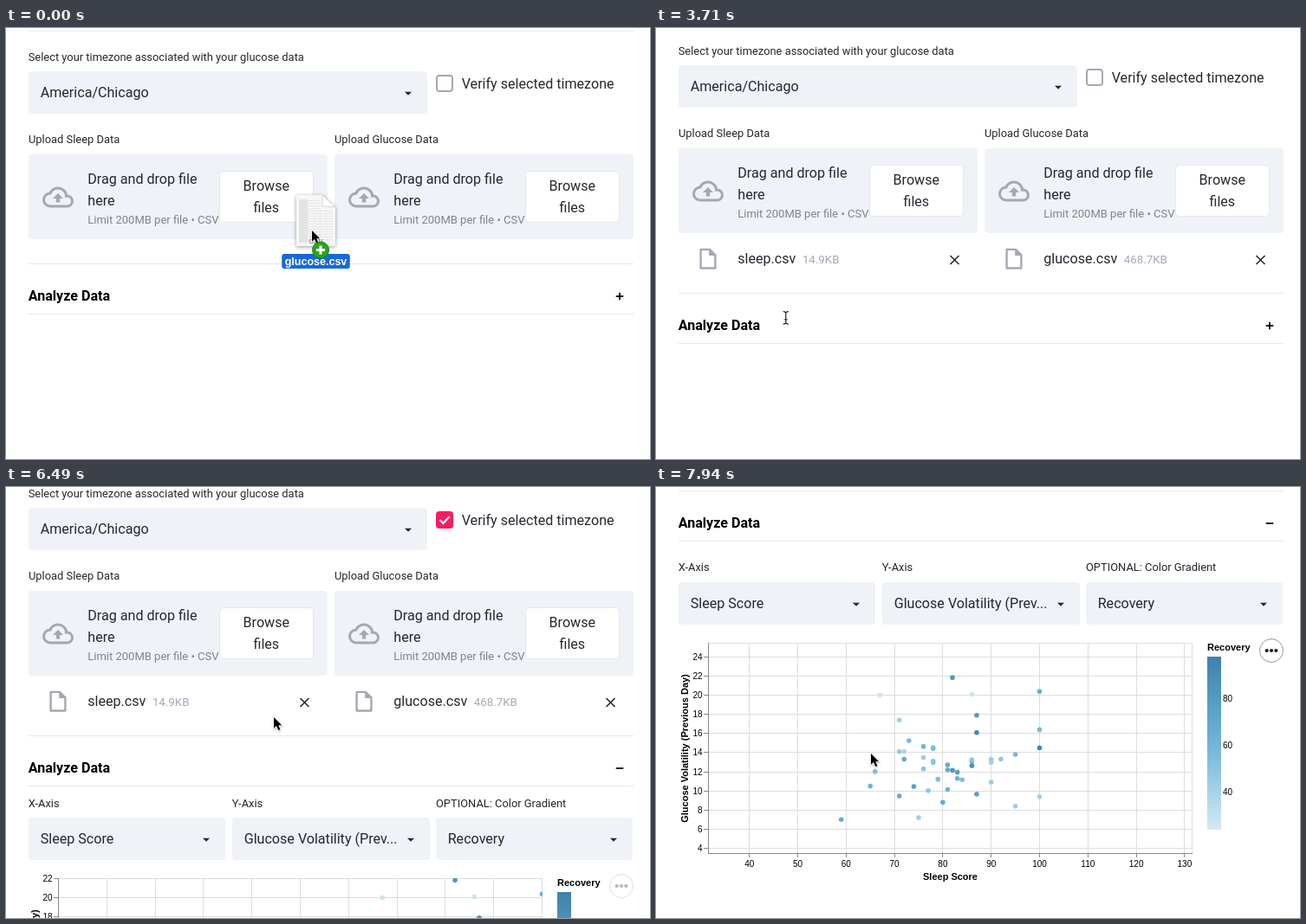
An HTML page with a canvas that plays this animation: 743x498 px, repeating every 8 s.

```html
<!DOCTYPE html>
<html lang="en">
<head>
<meta charset="utf-8">
<title>Glucose and sleep upload</title>
<style>
  html, body { margin: 0; width: 100%; height: 100%; overflow: hidden; background: #fff; }
  canvas { display: block; }
</style>
</head>
<body>
<canvas id="stage" width="743" height="498"></canvas>
<script>
const W = 743, H = 498, LOOP = 8000;
const ctx = document.getElementById('stage').getContext('2d');
const UI = 'Roboto, "Open Sans", sans-serif';
const PLOT = '"Liberation Sans", Arial, sans-serif';
const INK = '#262730', PANEL = '#eff2f6', MUTED = '#a3a8b4', RULE = '#e6e8ec';
const BODY = 16.1, SMALL = 12.9;

// Moments when the page changes, in ms
const DROP_GLUCOSE = 770, LEAVE = 1360, ENTER = 2650, DROP_SLEEP = 3330;
const WARN = 3800, CHECK = 4840, CLEAR = 6205, OPEN = 6350, JUMP = 6865, GRAB = 7366;

// Pointer path: time, x, y
const pointer = [
  [100, 353, 234], [380, 478, 200], [DROP_GLUCOSE, 478, 200], [1260, 300, 330],
  [2560, 0, 227], [3140, 128, 202], [3600, 128, 202], [3710, 149, 335], [4380, 330, 262],
  [4750, 506, 50], [4930, 506, 50], [5130, 405, 387], [5610, 362, 349], [6300, 340, 330],
  [6490, 309, 266], [7250, 309, 266], [GRAB, 424, 270], [7940, 248, 308]
];

const ramp = [[0, 213, 233, 244], [0.5, 111, 180, 214], [1, 62, 130, 172]];

// Sleep score, volatility, recovery: the outlying days, then a seeded cluster
const readings = [
  [59, 7, 66], [67, 20, 27], [71, 17.4, 42], [75, 7.2, 42], [82, 21.85, 82], [86, 20.1, 27],
  [87, 17.9, 82], [87, 16.1, 94], [95, 13.8, 57], [95, 8.4, 42],
  [100, 20.4, 66], [100, 16.4, 57], [100, 14.5, 94], [100, 9.4, 42]
];
let seed = 11;
const rand = () => (seed = (seed * 16807) % 2147483647) / 2147483647;
const spread = (mid, range) => mid + range * (rand() + rand() - 1);
for (let i = 0; i < 33; i++)
  readings.push([Math.round(spread(79, 14)), spread(12.3, 4.4), spread(58, 38)]);

const progress = (t, a, b) => Math.min(1, Math.max(0, (t - a) / (b - a)));

function track(keys, t) {
  const i = keys.findIndex(k => t <= k[0]);
  if (i === 0) return keys[0].slice(1);
  if (i < 0) return keys[keys.length - 1].slice(1);
  const a = keys[i - 1], b = keys[i], k = progress(t, a[0], b[0]);
  return a.slice(1).map((v, j) => v + (b[j + 1] - v) * k);
}

function text(s, x, y, size = BODY, color = INK, align = 'left', weight = 400, family = UI) {
  ctx.font = `${weight} ${size}px ${family}`;
  ctx.fillStyle = color;
  ctx.textAlign = align;
  ctx.fillText(s, x, y);
}

const plotText = (s, x, y, align, size = 10, weight = 400) =>
  text(s, x, y, size, '#000', align, weight, PLOT);

function stroke(color, width = 1) {
  ctx.strokeStyle = color;
  ctx.lineWidth = width;
  ctx.stroke();
}

function box(x, y, w, h, r, fill, edge) {
  ctx.beginPath();
  ctx.roundRect(x, y, w, h, r);
  ctx.fillStyle = fill;
  ctx.fill();
  if (edge) stroke(edge);
}

function poly(...pts) {
  ctx.beginPath();
  pts.forEach(([x, y]) => ctx.lineTo(x, y));
}

function fillPoly(color, ...pts) {
  poly(...pts);
  ctx.fillStyle = color;
  ctx.fill();
}

function line(x1, y1, x2, y2, color, width) {
  poly([x1, y1], [x2, y2]);
  stroke(color, width);
}

function disc(x, y, r, fill) {
  ctx.beginPath();
  ctx.arc(x, y, r, 0, Math.PI * 2);
  ctx.fillStyle = fill;
  ctx.fill();
}

function at(x, y, scale, paint) {
  ctx.save();
  ctx.translate(x, y);
  ctx.scale(scale, scale);
  paint();
  ctx.restore();
}

const rule = y => line(26, y + 0.5, 724, y + 0.5, RULE);

function cloud() {
  const deg = Math.PI / 180;
  ctx.beginPath();
  ctx.arc(19, 15, 4, 90 * deg, -98 * deg, true);
  ctx.arc(12, 11.5, 6.5, -5 * deg, -157 * deg, true);
  ctx.arc(6, 14, 5, -90 * deg, -270 * deg, true);
  ctx.closePath();
  stroke(MUTED, 2);
  fillPoly(MUTED, [8, 13], [12, 9], [16, 13]);
  ctx.fillRect(10.55, 12.9, 2.9, 3.1);
}

function sheet() {
  poly([5, 3], [13.6, 3], [19, 8.4], [19, 21], [5, 21]);
  ctx.closePath();
  ctx.lineJoin = 'round';
  stroke(MUTED, 2);
  fillPoly(MUTED, [13, 3], [13, 9], [19, 9]);
}

function select(x, y, w, label) {
  box(x, y, w, 49, 4, PANEL);
  text(label, x + 13.7, y + 30);
  const cx = x + w - 22, cy = y + 23.7;
  fillPoly(INK, [cx - 4, cy], [cx + 4, cy], [cx, cy + 4]);
}

function uploader(x, title, file, size) {
  const tx = x + 68.3;
  text(title, x, 133, SMALL);
  box(x, 146, 345, 98, 4, PANEL);
  at(x + 16, 177.5, 1.5, cloud);
  text('Drag and drop file', tx, 180);
  text('here', tx, 205);
  text('Limit 200MB per file • CSV', tx, 226, 13, '#7f8390');
  box(x + 220.5, 165.5, 108, 59, 4, '#fff', RULE);
  text('Browse', x + 274.3, 188, BODY, INK, 'center');
  text('files', x + 274.3, 213, BODY, INK, 'center');
  if (!file) return;
  at(x + 19.6, 259.3, 1.2, sheet);
  text(file, tx, 279);
  text(size, tx + ctx.measureText(file).width + 7.5, 279, 13.3, MUTED);
  for (const s of [-5, 5]) line(x + 313.5, 275 - s, x + 323.5, 275 + s, INK, 1.6);
}

function checkbox(on, focus) {
  if (focus) box(496, 52, 228, 24, 4, PANEL);
  if (on) {
    box(496, 54, 20, 20, 4, '#fd1a5e');
    poly([500.6, 64], [504.4, 67.8], [511.6, 60.2]);
    stroke('#fff', 2.2);
  } else {
    box(497, 55, 18, 18, 3, '#fff');
    stroke(MUTED, 2);
  }
  text('Verify selected timezone', 525.7, 70);
}

const shade = value =>
  `rgb(${track(ramp, (value - 23.7) / 74.1).map(Math.round).join()})`;

function chart(top, panX, panY, hover) {
  const left = 60, right = 618, bottom = top + 243;
  const px = v => left + 0.5 + v * 5.58 + panX;
  const py = v => top + 0.5 + (22 - v) * 11.05 + panY;
  const crisp = v => Math.floor(v) + 0.5;

  ctx.strokeStyle = '#ddd';
  ctx.lineWidth = 1;
  ctx.strokeRect(left + 0.5, top + 0.5, right - left, bottom - top);
  for (let v = 0; v <= 140; v += 10) {
    const x = crisp(px(v));
    if (x < left || x > right + 1) continue;
    line(x, top, x, bottom, '#ddd');
    line(x, bottom, x, bottom + 5, '#888');
    plotText(v, px(v), bottom + 16, 'center');
  }
  for (let v = 0; v <= 30; v += 2) {
    const y = crisp(py(v));
    if (y < top || y > bottom + 1) continue;
    line(left, y, right, y, '#ddd');
    line(left - 5, y, left, y, '#888');
    plotText(v, left - 6.5, py(v) + 3.5, 'right');
  }

  ctx.save();
  ctx.beginPath();
  ctx.rect(left, top, right - left + 1, bottom - top);
  ctx.clip();
  for (const [score, vol, recovery] of readings) disc(px(score), py(vol), 2.8, shade(recovery));
  ctx.restore();

  line(left + 0.5, top, left + 0.5, bottom + 1, '#888');
  line(left, bottom + 0.5, right + 1, bottom + 0.5, '#888');
  plotText('Sleep Score', 339.5, bottom + 31, 'center', 11, 700);
  at(36.5, top + 122, 1, () => {
    ctx.rotate(-Math.PI / 2);
    plotText('Glucose Volatility (Previous Day)', 0, 0, 'center', 11, 700);
  });

  plotText('Recovery', 636, top + 9, 'left', 11, 700);
  const g = ctx.createLinearGradient(0, top + 216, 0, top + 16);
  for (const [k, ...rgb] of ramp) g.addColorStop(k, `rgb(${rgb})`);
  ctx.fillStyle = g;
  ctx.fillRect(636, top + 16, 16, 200);
  for (let v = 40; v <= 80; v += 20) plotText(v, 654, top + 284 - 2.7 * v, 'left');

  ctx.save();
  ctx.globalAlpha = hover ? 1 : 0.32;
  disc(710, top + 9, 13.5, '#fff');
  stroke('#999');
  for (const d of [-5.3, 0, 5.3]) disc(710 + d, top + 9, 2.1, '#1b1e23');
  ctx.restore();
}

function alertBox() {
  box(26.5, 313.5, 697, 83, 4, '#ffcbd4', '#fb9bad');
  const red = '#93152b';
  text('Please verify the selected timezone for your glucose data for accurate pairing with your', 42.5, 348, BODY, red);
  text('sleep data.', 42.5, 373, BODY, red);
}

function drawArrow(x, y) {
  at(x, y, 0.9, () => {
    ctx.shadowColor = 'rgba(0,0,0,.3)';
    ctx.shadowBlur = 2;
    ctx.shadowOffsetY = 1;
    poly([0, 0], [0, 14.2], [3.3, 11.2], [5.7, 16.8], [8.3, 15.7], [5.9, 10.2], [10.2, 10.2]);
    ctx.closePath();
    stroke('#fff', 1.8);
    ctx.shadowColor = 'transparent';
    ctx.fillStyle = '#000';
    ctx.fill();
  });
}

function drawBeam(x, y) {
  line(x, y - 7, x, y + 7, INK, 1.2);
  for (const s of [-1, 1]) {
    poly([x - 3, y + s * 7.5], [x, y + s * 6.3], [x + 3, y + s * 7.5]);
    stroke(INK, 1.2);
  }
  line(x - 2, y + 2, x + 2, y + 2, INK);
}

function drawPage() {
  ctx.save();
  ctx.shadowColor = 'rgba(0,0,0,.4)';
  ctx.shadowBlur = 4;
  ctx.shadowOffsetY = 1;
  fillPoly('#f7f7f7', [-18, -41], [12, -41], [27, -27], [27, 18], [-18, 18]);
  ctx.restore();
  ctx.fillStyle = '#e2e2e2';
  ctx.fillRect(-15, -36, 10, 50);
  for (let r = -34.5; r < 13; r += 3) line(-15, r, r < -24 ? 10 : 24, r, '#e6e6e6');
  for (let c = -4.5; c < 25; c += 7) line(c, -24, c, 13, '#ececec');
  fillPoly('#fff', [12, -41], [12, -28], [27, -27]);
  ctx.closePath();
  stroke('#d6d6d6');
  text('CSV', 4.5, 15, 8, '#777', 'center', 400, PLOT);
}

function drawGhost(x, y, name) {
  at(x, y, 1, () => {
    drawPage();
    ctx.font = `700 12.5px ${PLOT}`;
    const w = ctx.measureText(name).width + 7;
    box(4.5 - w / 2, 27, w, 17, 3, '#1769d8');
    text(name, 4.5, 40, 12.5, '#fff', 'center', 700, PLOT);
    drawArrow(0, 0);
    disc(10, 22.5, 9.5, '#2aa41d');
    stroke('#1d7d15');
    line(5, 22.5, 15, 22.5, '#fff', 3);
    line(10, 17.5, 10, 27.5, '#fff', 3);
  });
}

function scrollAt(t) {
  if (t >= JUMP) return 309;
  if (t >= WARN) return 14 + Math.round(27 * progress(t, 6260, 6776));
  return t >= DROP_GLUCOSE ? 7 : 0;
}

function drawAnalysis(t, mx, my) {
  const off = Math.round(-20 * (1 - progress(t, 6260, 6776)));
  const ly = 406 + Math.round(off * 0.9), sy = 419 + off;
  text('X-Axis', 25.7, ly, SMALL);
  text('Y-Axis', 260.7, ly, SMALL);
  text('OPTIONAL: Color Gradient', 496, ly, SMALL);
  select(26, sy, 227, 'Sleep Score');
  select(261, sy, 228, 'Glucose Volatility (Prev...');
  select(496, sy, 227, 'Recovery');
  const drag = t >= GRAB;
  chart(489 + off, drag ? mx - 424 : 0, drag ? my - 270 : 0, t >= 7270);
}

function drawPointer(t, x, y) {
  if (t < DROP_GLUCOSE) drawGhost(x, y, 'glucose.csv');
  else if (t >= LEAVE && t < ENTER) return;
  else if (t >= ENTER && t < DROP_SLEEP) drawGhost(x, y, 'sleep.csv');
  else if (t > 3700 && t < WARN) drawBeam(x + 0.5, y);
  else drawArrow(x, y);
}

function draw(t) {
  const [mx, my] = track(pointer, t);
  const glucose = t >= DROP_GLUCOSE, sleep = t >= DROP_SLEEP;
  const warned = t >= WARN && t < CLEAR, open = t >= OPEN;

  ctx.fillStyle = '#fff';
  ctx.fillRect(0, 0, W, H);
  ctx.save();
  ctx.translate(0, -scrollAt(t));
  rule(3);
  text('Select your timezone associated with your glucose data', 25.7, 38, SMALL);
  select(26, 50, 460, 'America/Chicago');
  checkbox(t >= CHECK, t >= CHECK && t < CLEAR);
  uploader(26, 'Upload Sleep Data', sleep && 'sleep.csv', '14.9KB');
  uploader(379, 'Upload Glucose Data', glucose && 'glucose.csv', '468.7KB');
  if (warned) alertBox();

  const y = warned ? 413 : glucose ? 313 : 272;
  rule(y);
  text('Analyze Data', 25.7, y + 43, BODY, '#000', 'left', 600);
  line(703.7, y + 38, 712.3, y + 38, '#000', 1.7);
  if (!open) line(708, y + 33.7, 708, y + 42.3, '#000', 1.7);
  rule(y + 58);
  if (open) drawAnalysis(t, mx, my);
  ctx.restore();

  drawPointer(t, mx, my);
}

function frame(now) {
  draw(now % LOOP);
  requestAnimationFrame(frame);
}
draw(0);
requestAnimationFrame(frame);
</script>
</body>
</html>
```
